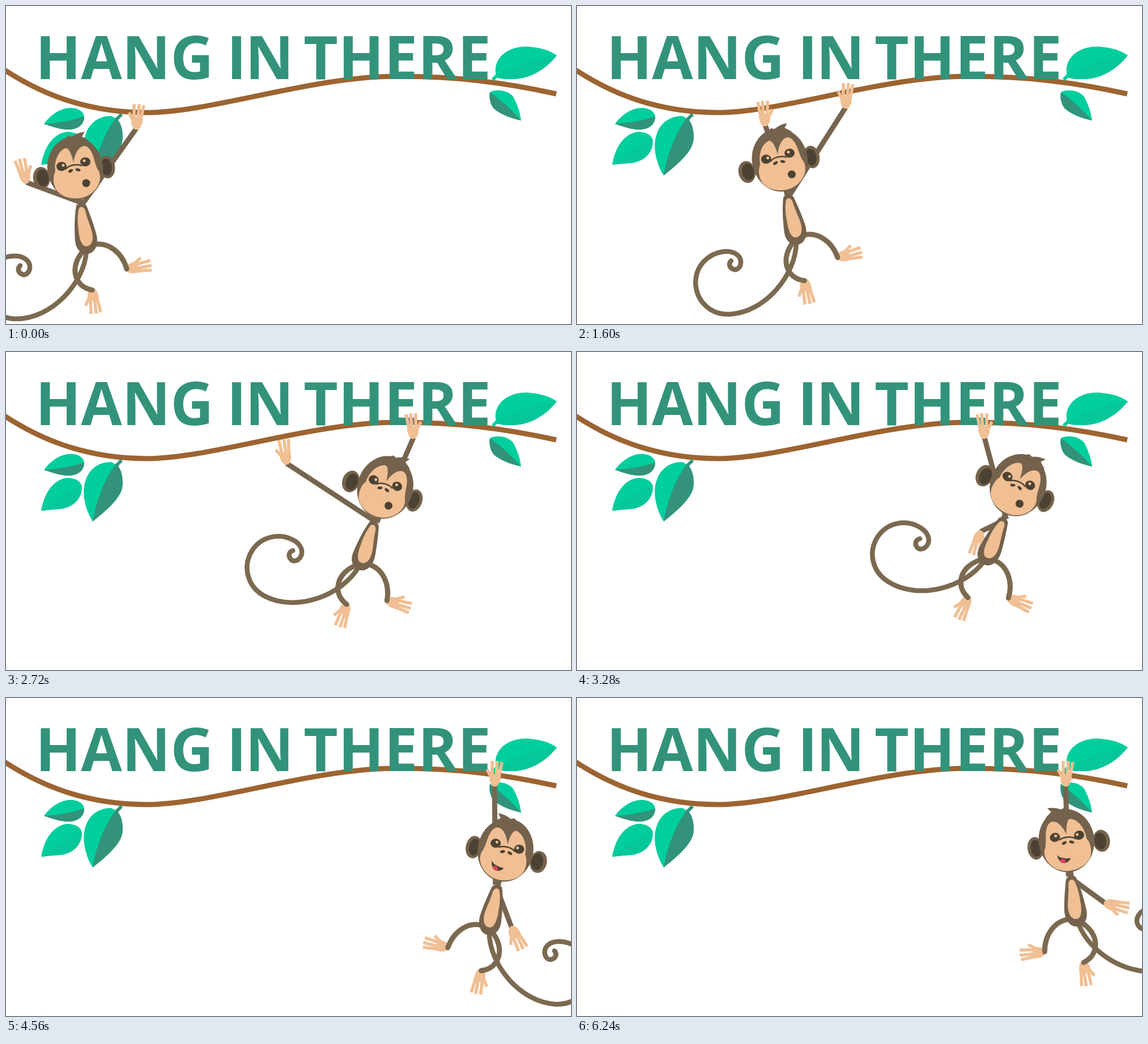
These frames come from a looping animation (997 px wide and 561 px high, 6.56 s). An HTML page:

```html
<!DOCTYPE html>
<html lang="en">
<head>
<meta charset="utf-8">
<title>Hang in there</title>
<style>
  html, body { margin: 0; width: 100%; height: 100%; overflow: hidden; background: #fff; }
  svg { display: block; width: 997px; height: 561px; }
  text { font: bold 105px "Open Sans", "Noto Sans", sans-serif; fill: #32937a; }
  .line { fill: none; stroke: #766550; stroke-width: 9; }
  .limb { fill: none; stroke: #7b6a50; stroke-width: 9; stroke-linecap: round; }
  .brown { fill: #74624c; }
  .dark { fill: #4c4233; }
  .skin { fill: #f0bf93; }
  .leaf { fill: #00ce9d; }
  .shade { fill: #32937a; }
  .soft { fill: #05c79a; }
</style>
</head>
<body>
<svg viewBox="0 0 997 561">
  <defs>
    <g id="hand">
      <path class="skin" d="M-4 1C-10-5-10-15-7-20L11-20C12-10 8 0 3 2Q0 3-4 1Z"/>
      <path d="M-4-17L-4-43M3-17L5-43M8-16L13-41M-4-10L-13-28" fill="none" stroke="#f0bf93" stroke-width="5.500"/>
    </g>
  </defs>

  <path class="line" style="stroke:#9c6431" d="M-2 113C70 160 150 188 250 188C365 187 540 124 690 124C795 124 880 135 971 155"/>

  <path class="leaf" d="M67 208C80 190 100 178 118 180C130 181 138 188 138 196C138 208 128 218 110 218C95 218 80 212 67 208Z"/>
  <path class="shade" d="M67 208Q105 206 138 195C138 208 128 218 110 218C95 218 80 212 67 208Z"/>
  <path class="leaf" d="M62 280C66 255 80 225 108 222C122 222 134 228 134 240C133 262 115 275 95 277Q78 278 62 280Z"/>
  <path class="soft" d="M62 280Q95 255 133 233C136 262 115 275 95 277Q78 278 62 280Z"/>
  <path class="line" style="stroke:#32937a;stroke-width:6" d="M190 205L204 191"/>
  <path class="leaf" d="M153 299C138 275 133 245 141 225C148 205 165 194 185 194C200 198 208 220 205 240C200 262 170 285 153 299Z"/>
  <path class="shade" d="M153 299Q163 240 194 197C204 206 208 223 205 240C200 262 170 285 153 299Z"/>

  <path class="line" style="stroke:#00ce9d;stroke-width:6" d="M859 130L870 119"/>
  <path class="leaf" d="M866 126C855 95 885 68 925 72Q953 74 972 87C950 115 920 130 890 129Q873 129 866 126Z"/>
  <path class="soft" d="M866 126Q905 96 972 87C950 115 920 130 890 129Q873 129 866 126Z"/>
  <path class="leaf" d="M854 152C865 146 885 148 895 160Q906 180 909 202C890 198 870 190 860 180C854 172 852 160 854 152Z"/>
  <path class="shade" d="M854 152Q880 170 909 202C890 198 870 190 860 180C854 172 852 160 854 152Z"/>

  <text x="52" y="129">HANG</text>
  <text x="389.500" y="129" letter-spacing="-2">IN</text>
  <text x="525" y="129" letter-spacing=".7">THERE</text>

  <line id="armA" class="line"/>
  <line id="armB" class="line"/>
  <use id="handA" href="#hand"/>
  <use id="handB" href="#hand"/>

  <g id="monkey">
    <path class="limb" style="stroke-width:8.500" d="M142 432C138 490 80 552 18 552C-15 552-39 528-40 497C-40 462-12 441 16 441C34 441 43 452 42 462C41 472 33 476 28 473C21 470 20 463 25 458"/>
    <use href="#hand" transform="translate(214 464) rotate(75)"/>
    <use href="#hand" transform="translate(152 500) rotate(177) scale(-1 1)"/>
    <path class="limb" d="M138 430C120 450 118 470 127 485Q135 498 152 501M150 422C182 413 206 438 213 464"/>
    <path class="line" d="M129 335L132 354"/>
    <path class="brown" d="M124 352C120 375 121 400 122 415C124 432 135 438 145 437C158 435 163 420 160 405C155 385 147 365 142 352Q133 343 124 352Z"/>
    <path class="skin" d="M128 360C129 353 137 352 140 361C144 380 153 395 153 408C153 420 147 424 141 424C133 423 129 410 128 395C126 382 126 370 128 360Z"/>

    <g transform="rotate(-8 122 286)">
      <ellipse class="brown" cx="61" cy="295" rx="15" ry="19.500"/>
      <ellipse class="dark" cx="63" cy="295" rx="10.500" ry="15"/>
      <ellipse class="brown" cx="178" cy="292" rx="14" ry="20"/>
      <ellipse class="dark" cx="177" cy="292" rx="9.500" ry="15"/>
      <ellipse class="brown" cx="122" cy="286" rx="49" ry="56"/>
    </g>
    <path class="brown" d="M98 240L110 229L116 231Q126 223 139 222L134 230L146 237L138 248Z"/>
    <path class="skin" d="M119 276C116 262 111 250 105 251C94 254 84 272 87 292C82 300 83 318 91 327C104 342 132 343 147 333C162 324 170 306 164 292C160 286 158 280 156 272C152 256 145 246 137 247C127 249 121 262 119 276Z"/>
    <ellipse class="dark" cx="98" cy="283" rx="9" ry="8"/>
    <ellipse class="dark" cx="140" cy="275" rx="9" ry="8"/>
    <circle class="skin" cx="101" cy="281" r="2.500"/>
    <circle class="skin" cx="138" cy="273" r="2.500"/>
    <path fill="none" stroke="#4c4233" stroke-width="2.500" d="M105 288C111 280 127 278 134 282"/>
    <ellipse class="dark" cx="114" cy="291" rx="4.500" ry="2.500" transform="rotate(-30 114 291)"/>
    <ellipse class="dark" cx="127" cy="289" rx="4.500" ry="2.500" transform="rotate(15 127 289)"/>
    <circle id="gasp" class="dark" cx="141.500" cy="312.500" r="7"/>
    <g id="smile">
      <path class="dark" d="M145 306Q141 315 123 318C131 327 146 326 145 306Z"/>
      <ellipse cx="138" cy="319" rx="5" ry="3.500" fill="#e0405f" transform="rotate(-25 138 319)"/>
    </g>
  </g>
</svg>
<script>
  const LOOP = 6560, STEP = 80, TURN = 4320, SWINGS = [TURN, 5040, 5840];
  const el = id => document.getElementById(id);

  // Key poses: time, x, y, angle
  const hip = [[0, 147, 425, 0], [960, 272, 382, 0], [1760, 425, 412, -4],
    [2240, 537, 389, 16], [3280, 726, 366, 32], [4240, 860, 375, 28]];

  // Each hand grips the branch, drops below the body and reaches for the next grip
  const grip = (from, to, x, y, turns) => [[from, x, y, -360 * turns], [to, x, y, -360 * turns]];
  const handA = [...grip(0, 800, 230, 216, 0), [960, 262, 345, -180],
    ...grip(1520, 2560, 474, 179, 1), [3280, 712, 317, -530], ...grip(3760, LOOP, 862, 154, 2)];
  const handB = [[0, 36, 311, -10], [400, 190, 360, -190],
    ...grip(800, 1600, 332, 210, 1), [2240, 522, 325, -495],
    ...grip(2640, 3920, 719, 151, 2), [4240, 850, 330, -900]];

  // Smooth curve through the keys that never overshoots them
  function at(keys, t) {
    const n = keys.length - 1;
    const i = Math.max(0, Math.min(n - 1, keys.findLastIndex(k => k[0] <= t)));
    const a = keys[i], b = keys[i + 1], dt = b[0] - a[0];
    const p = Math.min(1, (t - a[0]) / dt), q = 1 - p;
    return [1, 2, 3].map(j => {
      const secant = k => (keys[k + 1][j] - keys[k][j]) / (keys[k + 1][0] - keys[k][0]);
      const slope = k => {
        const u = secant(Math.max(0, k - 1)), v = secant(Math.min(n - 1, k));
        return u * v > 0 ? 2 * u * v / (u + v) : 0;
      };
      return a[j] * q * q * (1 + 2 * p) + b[j] * p * p * (1 + 2 * q)
        + dt * p * q * (slope(i) * q - slope(i + 1) * p);
    });
  }

  const offset = (rest, shift, amount) => rest.map((v, j) => v + shift[j] * amount);
  const place = (id, [x, y, angle], side, tail = "") => el(id).setAttribute("transform",
    `translate(${x} ${y}) rotate(${angle}) scale(${side} 1) ${tail}`);

  function draw(time) {
    const t = Math.floor((time % LOOP) / STEP) * STEP;
    const turned = t >= TURN, side = turned ? -1 : 1;
    let body = at(hip, t), a = at(handA, t), b = at(handB, t);

    if (turned) {
      // Swing out for 160 ms, settle by 400 ms, then rest
      const u = Math.min(400, t - SWINGS.findLast(s => s <= t));
      const out = (1 + Math.cos(Math.PI * (u - 160) / 240)) / 2;
      body = offset([878, 392, -16], [-40, 18, 26], out);
      b = offset([932, 362, 108], [-53, 57, 67], out);
    }

    place("monkey", body, side, "translate(-147 -425)");
    el("gasp").style.display = turned ? "none" : "";
    el("smile").style.display = turned ? "" : "none";

    const [x, y, angle] = body, r = angle * Math.PI / 180;
    const c = Math.cos(r), s = Math.sin(r), sx = -11 * side, sy = -77;
    const shoulder = { x1: x + sx * c - sy * s, y1: y + sx * s + sy * c };
    [["A", a, 1], ["B", b, -1]].forEach(([name, hand, flip]) => {
      const ends = { ...shoulder, x2: hand[0], y2: hand[1] };
      for (const k in ends) el("arm" + name).setAttribute(k, ends[k]);
      place("hand" + name, hand, flip);
    });
  }

  const start = performance.now();
  (function tick() {
    draw(performance.now() - start);
    requestAnimationFrame(tick);
  })();
</script>
</body>
</html>
```
